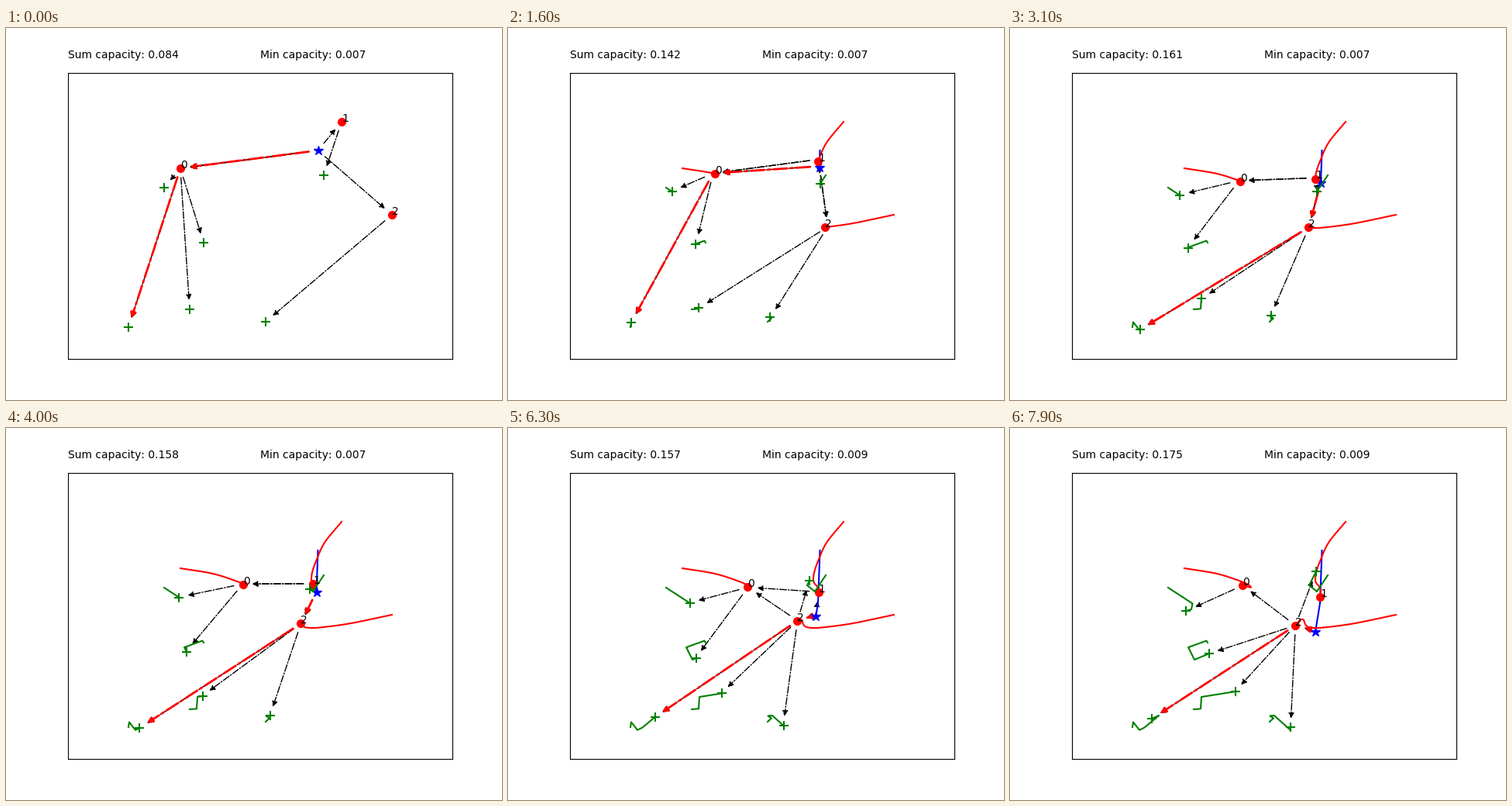
Animation of 640 by 480 pixels, one loop 8000 ms. Source, as a matplotlib script:

```python
import numpy as np
import matplotlib.pyplot as plt
from matplotlib.animation import FuncAnimation
from matplotlib.patches import FancyArrowPatch

FRAMES, STEP_MS = 80, 100
ticks = np.arange(FRAMES)
plt.rcParams["text.kerning_factor"] = 6


def legs(*points):
    """Straight legs through (tick, x, y) corners, in pixels with y down."""
    t, x, y = np.array(points, float).T
    return np.column_stack([np.interp(ticks, t, x), np.interp(ticks, t, y)])


def glide(*points):
    """Cubic Hermite curve through (tick, x, y) points."""
    p = np.array(points, float)
    t, xy = p[:, 0], p[:, 1:]
    m = np.gradient(xy, t, axis=0)
    i = np.clip(np.searchsorted(t, ticks, side="right") - 1, 0, len(t) - 2)
    h = (t[i + 1] - t[i])[:, None]
    u = (ticks - t[i])[:, None] / h
    return ((1 + 2 * u) * (1 - u) ** 2 * xy[i] + u * (1 - u) ** 2 * h * m[i]
            + u ** 2 * (3 - 2 * u) * xy[i + 1] + u ** 2 * (u - 1) * h * m[i + 1])


base = legs((0, 402.5, 158), (50, 400, 226), (79, 394, 263))
relays = {
    "0": glide((0, 225, 181), (16, 267, 188), (31, 297, 197.5),
               (56, 311, 205.5), (79, 300, 203)),
    "1": glide((0, 433, 121), (8, 411, 148), (16, 400, 172),
               (31, 394, 194.5), (50, 400, 206), (79, 400, 218)),
    "2": glide((0, 498, 241), (8, 445, 252), (16, 409, 257),
               (28, 388, 257.5), (50, 378, 247), (79, 368, 255)),
}
users = {
    "A": legs((0, 204, 206), (65, 235.5, 226.5), (72, 234, 234), (79, 227, 236)),
    "B": legs((0, 255, 277), (2, 253.5, 274.5), (30, 230, 283),
              (58, 238, 299), (79, 257, 291)),
    "C": legs((0, 237, 363), (14, 246, 362.3), (33, 247, 347), (79, 291, 340)),
    "D": legs((0, 158, 386), (17, 159, 379.5), (30, 167, 389.7),
              (42, 173.5, 386.5), (66, 192, 371), (79, 183, 375)),
    "E": legs((0, 335, 379), (9, 340, 374.5), (28, 335.5, 371.5),
              (40, 341, 371), (73, 362, 390), (79, 362, 386)),
    "F": legs((0, 410, 190), (31, 396, 211), (54, 386, 203), (79, 395, 185)),
}
tracks = {"S": base, **relays, **users}
sums = np.interp(ticks, [0, 8, 16, 31, 50, 63, 79],
                 [.084, .11, .142, .161, .154, .157, .175])


def relay_chain(user, n):
    """Relays between the base and a user."""
    if user == "E" or (user == "C" and n >= 12) or (user == "D" and n >= 24):
        return "2"
    if user == "F":
        return "1" if n < 56 else "2"
    if user == "D" or n < 4:
        return "0"
    if user == "B" and n >= 58:
        return "20" if n < 70 else "2"
    return "10" if n < 70 else "20"


def min_capacity(n):
    relay = relay_chain("D", n)[-1]
    if relay == "0":
        return 0.007
    gap = tracks[relay][n] - tracks["D"][n]
    return round(460 / float(gap @ gap), 3)


fig, ax = plt.subplots(figsize=(6.4, 4.8), dpi=100)
ax.set(xlim=(80, 576), ylim=(427.2, 57.6), xticks=[], yticks=[])
sum_text = ax.text(0, 1.05, "", transform=ax.transAxes)
min_text = ax.text(0.5, 1.05, "", transform=ax.transAxes)

trails, dots = {}, {}
for group, color, marker, size, edge in (({"S": base}, "blue", "*", 9, 1),
                                         (relays, "red", "o", 7, 1),
                                         (users, "green", "+", 9, 1.5)):
    for key in group:
        dots[key], = ax.plot([], [], ls="", color=color, marker=marker,
                             ms=size, mew=edge)
        trails[key], = ax.plot([], [], color=color, lw=1.5)
labels = {k: ax.text(0, 0, k) for k in relays}
arrows = []


def draw_route(user, n, color, width):
    # Links show the positions of the step before the move.
    stops = "S" + relay_chain(user, n) + user
    ends = [tracks[s][max(n - 1, 0)] for s in stops]
    for a, b in zip(ends, ends[1:]):
        arrow = FancyArrowPatch(
            a, b, arrowstyle="-|>", mutation_scale=10, shrinkA=8.66,
            shrinkB=8.66, color=color, lw=width, ls="-.", zorder=1)
        arrows.append(ax.add_patch(arrow))


def update(n):
    while arrows:
        arrows.pop().remove()
    for user in users:
        draw_route(user, n, "black", 1)
    draw_route("D", n, "red", 2)
    for key, xy in tracks.items():
        trails[key].set_data(*xy[:n + 1].T)
        dots[key].set_data(*xy[n:n + 1].T)
    for key, label in labels.items():
        label.set_position(tracks[key][n])
    sum_text.set_text(f"Sum capacity: {round(float(sums[n]), 3)}")
    min_text.set_text(f"Min capacity: {min_capacity(n)}")
    return []


anim = FuncAnimation(fig, update, frames=FRAMES, interval=STEP_MS,
                     init_func=lambda: update(0), repeat=True, repeat_delay=0)
plt.show()
```
